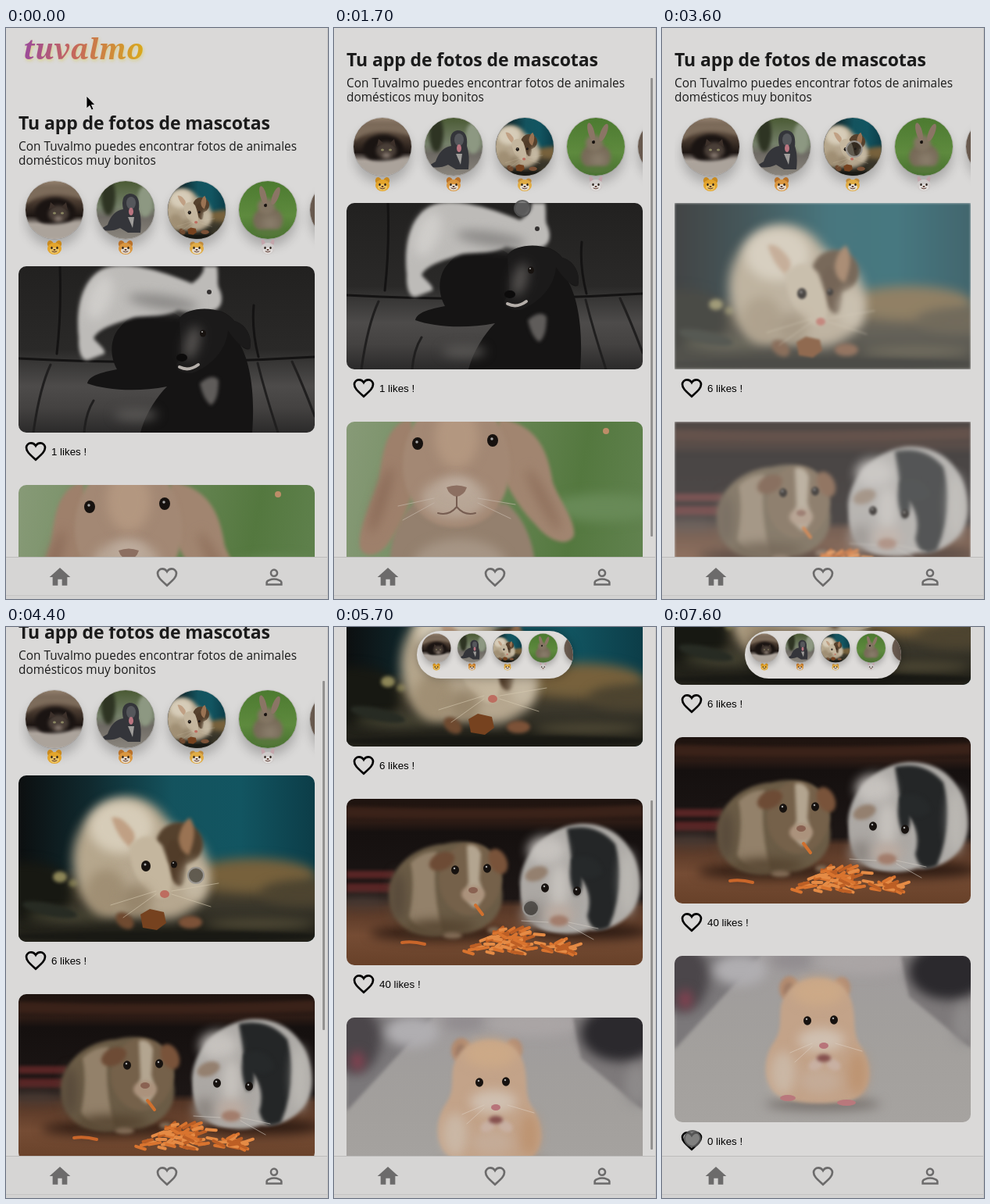
Animation, 412 px wide and 731 px high, one loop 8 s. Source, as an HTML page:

```html
<!DOCTYPE html>
<html lang="es">
<head>
<meta charset="utf-8">
<title>Fotos de mascotas</title>
<style>
html, body { margin: 0; width: 100%; height: 100%; overflow: hidden; }
body { position: relative; background: #dad9d8; color: #1b1b1b; }
div, svg, h1, p, span { position: absolute; margin: 0; }
#stage { left: 0; top: 0; width: 412px; height: 731px; overflow: hidden; background: #dad9d8; }
#page { left: 0; top: 0; width: 412px; height: 1196px; }
#logo { left: 15px; top: 6px; width: 200px; height: 50px; }
#logo text { font: italic bold 36px "Noto Serif", serif; }
h1 { left: 16px; top: 107px; font: bold 23px/28px "Open Sans", sans-serif; letter-spacing: -.1px; white-space: nowrap; }
p { left: 16px; top: 143px; font: 15.4px/18px "Open Sans", sans-serif; white-space: nowrap; }
.list { left: 16px; top: 189px; width: 379px; height: 122px; overflow: hidden; }
.thumb { top: 7px; width: 74px; height: 74px; border-radius: 50%; overflow: hidden; box-shadow: 0 10px 14px rgba(0,0,0,.22), 0 0 0 1px #c3c1bf; }
.thumb svg, .photo svg { left: 0; top: 0; width: 100%; height: 100%; filter: blur(.6px); }
.face { top: 82px; width: 20px; height: 20px; }
#pill { left: 106px; top: 5px; width: 400px; height: 122px; border-radius: 61px; background: #dedcda; transform: scale(.5); transform-origin: 0 0; }
#pillWrap { left: 0; top: 0; filter: drop-shadow(0 0 6px rgba(0,0,0,.3)); }
.post { left: 0; width: 412px; height: 280px; }
.frame { left: 16px; top: 0; width: 379px; height: 213px; overflow: hidden; border-radius: 10px; }
.photo { left: 0; top: 0; width: 379px; height: 213px; }
.icon { width: 32px; height: 32px; }
.likes { left: 58px; top: 230px; font: 13.333px/16px "Liberation Sans", Arial, sans-serif; color: #000; white-space: nowrap; }
#bar { left: 405px; top: 0; width: 3px; border-radius: 1px; background: #929190; }
#nav { left: 0; top: 677px; width: 412px; height: 48px; background: #d6d5d4; border-top: 1px solid #bdbcbb; border-bottom: 1px solid #c6c5c4; }
#foot { left: 0; top: 727px; width: 412px; height: 4px; background: #d3d2d1; }
#edge { left: 411px; top: 0; width: 1px; height: 731px; background: #c6c5c4; }
#touch { left: -11px; top: -11px; width: 18px; height: 18px; border: 2px solid rgba(165,162,158,.85); border-radius: 50%; background: rgba(32,30,28,.6); }
#touch.down { border-color: rgba(70,70,70,.55); background: rgba(105,105,105,.8); }
#arrow { left: 102px; top: 86px; width: 14px; height: 21px; }
.soft { filter: blur(7px); }
.fur { filter: blur(2px); }
</style>
</head>
<body>
<div id="stage"></div>
<script>
const oval = (x, y, rx, ry, fill, turn = 0, cls = "") =>
  `<ellipse class="${cls}" cx="${x}" cy="${y}" rx="${rx}" ry="${ry}" fill="${fill}" transform="rotate(${turn} ${x} ${y})"/>`;
const soft = (x, y, rx, ry, fill, turn) => oval(x, y, rx, ry, fill, turn, "soft");
const puff = (x, y, rx, ry, fill, turn) => oval(x, y, rx, ry, fill, turn, "fur");
const shape = (d, fill, cls = "") => `<path class="${cls}" d="${d}" fill="${fill}"/>`;
const fur = (d, fill) => shape(d, fill, "fur");
const line = (d, color, w = 1) => `<path d="${d}" fill="none" stroke="${color}" stroke-width="${w}" stroke-linecap="round"/>`;
const eye = (x, y, r) => oval(x, y, r, r * 1.15, "#17120f") + oval(x - 1, y - 2, r / 4, r / 4, "#aaa");

function carrots() {
  let seed = 7, out = "";
  const rnd = () => (seed = seed * 16807 % 2147483647) / 2147483647;
  for (let i = 0; i < 80; i++) {
    const y = 168 + rnd() * 28, half = 18 + (y - 168) * 2.2;
    const x = 210 + (rnd() * 2 - 1) * half + (y - 168) * .5;
    const a = rnd() * 2 - 1, n = 7 + rnd() * 8;
    out += line(`M${x.toFixed(1)} ${y.toFixed(1)}l${n.toFixed(1)} ${(a * 7).toFixed(1)}`, ["#d9742f", "#e58b45", "#bd5f25"][i % 3], 4);
  }
  return out + line("M71 184q14-2 29 2", "#c9662a", 4);
}

const photos = {
  couch: {
    bg: "linear-gradient(#222120, #2a2928 50%, #383736 58%, #4d4b4a 72%, #444241 85%, #2b2a2a)",
    art: line("M53 0q2 60 -4 112M301 50q-3 30 6 66M0 118q190 10 379-2", "#141313", 3)
      + line("M41 126q-14 30-22 87M96 172q-10 16-12 41M306 124q10 40 26 89M350 122q14 30 29 70", "#201f1f", 3)
      + shape("M130 78C150 52 190 50 208 66C225 50 262 50 276 70C292 74 300 92 296 106C290 108 284 102 281 96C296 120 303 160 299 213H156C162 190 176 168 190 154C150 162 110 158 88 150C90 140 106 136 126 132C114 110 120 88 130 78Z", "#151414")
      + fur("M89 120C82 122 76 112 77 92C72 50 84 12 112 2C140-8 190 8 222 22C232 16 240 4 236 0H254C256 12 254 20 256 27C263 40 261 54 249 57C236 60 218 60 204 55C190 66 166 62 146 66C124 74 104 78 96 92C102 100 112 106 110 112Z", "#bdbbb8")
      + soft(185, 46, 45, 9, "#8b8987", 8) + soft(104, 40, 15, 30, "#cfcdca", 20)
      + oval(244, 33, 3, 3, "#343131") + shape("M206 66C218 50 262 50 276 70C292 74 300 92 296 106C286 106 276 94 268 82C266 108 246 128 222 137C206 138 198 130 204 122C212 112 206 92 206 66Z", "#1b1a1a")
      + soft(222, 98, 9, 22, "#555250", 15) + oval(209, 117, 7, 5, "#0c0b0b")
      + line("M206 129q12 6 24-3", "#b5afaa", 4) + eye(236, 86, 4)
      + fur("M232 150q16-14 24-4q0 26-10 32q-10-8-14-28Z", "#5f5c5a") + soft(150, 190, 28, 7, "#5a5856")
  },
  lop: {
    bg: "linear-gradient(100deg, #879a77, #6b8858 45%, #54783f 75%, #628350)",
    art: soft(330, 110, 70, 18, "#688a57") + oval(332, 12, 4, 4, "#bd8d68")
      + fur("M62 213C50 175 56 135 85 105H205C236 130 246 180 240 213Z", "#94806e")
      + soft(145, 185, 60, 35, "#a69585")
      + fur("M82-4C50 4 46 40 42 72C32 105 14 138 17 160C22 176 40 172 52 158C72 130 84 100 92 62Z", "#9e806b")
      + fur("M196-4C246 4 258 40 264 78C274 104 294 128 291 146C282 162 258 152 242 132C218 108 198 72 186 34Z", "#a18570")
      + soft(44, 100, 7, 45, "#8b6b58", 18) + soft(252, 100, 7, 45, "#8f705c", -28)
      + fur("M92-5H190C216 35 216 80 190 114C166 142 116 142 94 116C64 80 66 30 92-5Z", "#a38874")
      + soft(141, 20, 28, 40, "#b39780") + soft(138, 98, 42, 26, "#b8a696")
      + eye(91, 28, 7) + eye(187, 24, 7) + soft(141, 84, 20, 12, "#bdab9c")
      + shape("M128 84q13-5 26 0q-3 10-13 12q-10-2-13-12Z", "#8c6f61")
      + line("M141 96v13q-10 12-24 8M141 109q10 12 24 8", "#765d51", 2)
      + line("M112 98l-46 10M112 104l-40 22M168 98l48 8M168 104l42 20", "#c5b8ab", .7)
  },
  mouse: {
    bg: "linear-gradient(rgba(0,0,0,0) 55%, #4a4230 68%, #38352a 80%, #24231b 92%), linear-gradient(90deg, #0c0f10, #10292e 24%, #14535e 52%, #125561 75%, #0c3d48)",
    art: soft(300, 128, 80, 22, "#77613c") + soft(360, 150, 50, 16, "#4d4430") + soft(10, 150, 60, 40, "#171812")
      + soft(60, 180, 50, 6, "#4c4a36") + soft(310, 190, 70, 6, "#57503a") + puff(190, 206, 200, 7, "#191914")
      + puff(53, 130, 9, 7, "#8d8657") + puff(70, 138, 6, 5, "#6c6840") + puff(40, 172, 36, 8, "#272b23", 12)
      + soft(136, 104, 66, 76, "#b6a78d", 12) + soft(186, 124, 58, 60, "#b6a78f")
      + soft(132, 66, 42, 34, "#d6ccb8") + soft(112, 150, 26, 30, "#a08f74")
      + puff(206, 88, 30, 28, "#55412d") + puff(202, 112, 12, 30, "#513c29", -10)
      + fur("M119 54Q132 50 147 72Q152 84 142 92Q126 78 119 54Z", "#c0a084")
      + fur("M219 54Q231 70 218 102Q206 98 205 80Q208 62 219 54Z", "#9a7353")
      + fur("M142 90Q164 66 184 90Q200 130 193 154Q180 162 166 148Q142 128 142 90Z", "#c4b69e")
      + soft(226, 136, 16, 26, "#c4b8a2") + soft(150, 160, 20, 20, "#97866c")
      + eye(163, 116, 6) + eye(199, 114, 4)
      + oval(187, 152, 6, 5, "#bd6d60") + puff(136, 186, 13, 9, "#6f4a30", 40) + puff(220, 188, 15, 8, "#7c5238")
      + shape("M156 178l12-7 18 4 3 14-12 9-18-3Z", "#76421f")
      + line("M176 148l-58 18M176 152l-42 30M196 148l60-10M196 152l50 16", "#d6c9b0", .6)
  },
  pigs: {
    bg: "linear-gradient(#1d130f, #2c1b15 14%, #15100f 20%, #1c1615 60%, #553626 65%, #754c34 82%, #684129)",
    art: fur("M0 10Q200 16 379 8V22Q200 28 0 24Z", "#3a2219") + fur("M0 92H62V102H0ZM0 108H60V120H0Z", "#582525") + soft(20, 132, 40, 8, "#4b3c35")
      + soft(120, 172, 90, 9, "#2c1a12") + soft(310, 170, 80, 10, "#2c1a12")
      + fur("M55 130C50 88 88 60 124 58C170 46 204 70 198 112C206 146 180 170 148 172C100 182 60 172 55 130Z", "#6b5c46")
      + fur("M82 82Q98 66 116 68Q108 110 122 168Q88 170 80 150Q88 110 82 82Z", "#93816a")
      + soft(120, 164, 46, 9, "#54432f") + soft(66, 125, 9, 32, "#57493a")
      + puff(158, 103, 40, 46, "#75614a") + fur("M154 60Q166 56 172 70L170 104Q180 130 164 140Q148 132 156 106Z", "#b3a590")
      + puff(122, 80, 17, 11, "#6d4b35", -25) + puff(194, 80, 11, 17, "#79533a", -25)
      + eye(139, 91, 5) + eye(180, 89, 5) + puff(162, 122, 15, 11, "#ab927c") + oval(162, 117, 6, 4, "#8a6252")
      + line("M165 136l9 12", "#d0702e", 4) + puff(136, 175, 12, 4, "#806a55") + puff(188, 168, 8, 4, "#806a55")
      + fur("M222 108C224 66 262 34 300 32C350 30 378 72 375 116C372 152 340 170 310 168C270 182 228 164 222 108Z", "#aeaba7")
      + fur("M282 38Q320 30 344 58Q358 110 336 164Q314 176 308 150Q318 116 290 92Z", "#242627")
      + soft(360, 108, 9, 42, "#bcb9b4") + puff(264, 124, 41, 46, "#aca8a4") + soft(256, 66, 24, 18, "#c6c2be")
      + soft(272, 112, 12, 30, "#c6c2bd") + soft(238, 148, 14, 16, "#8f8984")
      + fur("M288 76Q320 66 328 94Q316 106 302 100Q302 124 292 124Q282 100 288 76Z", "#26292a") + puff(243, 96, 15, 9, "#94806f", -20)
      + eye(254, 114, 5) + eye(295, 118, 5) + soft(272, 148, 19, 12, "#bcaba0") + puff(272, 156, 12, 7, "#a27d6c")
      + line("M284 158l38 8M284 162l32 18M258 158l-34-2", "#d2cbc3", .6) + carrots()
  },
  hamster: {
    bg: "linear-gradient(#a09c9d, #a19e9c 30%, #a3a09d 60%, #a6a3a0)",
    art: fur("M0 0H110L0 120Z", "#7b787a") + soft(10, 28, 34, 44, "#4b464a") + soft(84, 18, 34, 20, "#b0aeb1")
      + soft(150, 4, 26, 14, "#928d90") + soft(240, 8, 60, 16, "#aaa5a5") + fur("M290 0H379V118L300 52Z", "#7d797a")
      + soft(350, 20, 50, 36, "#2b292d") + soft(372, 86, 16, 26, "#8d8a8a") + soft(14, 56, 8, 12, "#8d4152")
      + soft(190, 190, 74, 8, "#77716d") + puff(147, 42, 13, 16, "#b28b70") + puff(214, 41, 11, 14, "#b38c72")
      + puff(147, 44, 7, 10, "#9a7763")
      + fur("M136 66C144 18 220 16 228 64C232 84 228 96 236 112C260 148 250 184 216 187C190 190 160 190 140 182C112 172 112 134 126 112C138 96 134 84 136 66Z", "#c3a389")
      + soft(184, 46, 34, 18, "#cca987") + soft(139, 150, 16, 28, "#cab7a5") + soft(234, 150, 12, 28, "#bd9472")
      + soft(188, 108, 30, 15, "#d0c0b1") + soft(186, 160, 26, 16, "#c4ab97") + eye(170, 83, 5) + eye(204, 82, 5) + oval(191, 115, 6, 4, "#b8747a")
      + puff(181, 139, 10, 7, "#c8b0a2", -30) + puff(203, 139, 10, 7, "#c8b0a2", 30) + puff(191, 131, 9, 5, "#85504e")
      + oval(145, 182, 10, 4, "#b9787c") + oval(220, 188, 12, 4, "#b9787c")
      + line("M176 112l-28 12M176 116l-22 20M206 112l34 10", "#dccfc2", .6)
  }
};

// Small round category pictures, drawn on a 74 unit square
const cat = { bg: "linear-gradient(#917f6c, #4b3c31 35%, #1d1613 60%, #b4aaa2 76%)",
  art: fur("M0 30Q30 6 74 24V8H0Z", "#7d6c5b") + puff(38, 40, 26, 19, "#1a1412") + puff(42, 42, 13, 11, "#4a3f38")
    + shape("M30 36l2-9 7 6ZM46 33l6-6 2 10Z", "#3c302a") + oval(37, 41, 2, 1.5, "#8a8662") + oval(47, 41, 2, 1.5, "#8a8662")
    + puff(42, 48, 5, 3, "#8a7c73") + fur("M0 54Q30 58 74 50V74H0Z", "#aba39b") };
const dog = { bg: "linear-gradient(#4a5a34, #75806a 45%, #6e6a64 62%, #8a857d)",
  art: puff(15, 20, 9, 24, "#2e3423") + puff(62, 26, 10, 20, "#8d9882") + shape("M14 56Q20 38 34 36Q30 18 42 16Q56 16 54 36Q58 48 56 66H40L30 60Q18 66 4 62Z", "#34353a")
    + oval(44, 28, 6, 8, "#55575b") + oval(44, 39, 3, 5, "#ba7580") + shape("M40 46h8l-2 14Z", "#a09e9b") };
const hare = { bg: "linear-gradient(#4c7a30, #5e8a3e 60%, #47702f)",
  art: puff(37, 50, 19, 17, "#776a58") + puff(35, 32, 11, 10, "#837563") + oval(31, 18, 4, 12, "#8b7565", -15) + oval(47, 19, 4, 12, "#8b7565", 22)
    + eye(34, 31, 2) + soft(40, 54, 9, 8, "#968a78") + puff(38, 66, 22, 4, "#55783a") };
const other = { bg: "linear-gradient(90deg, #6a5b50, #3d332d)", art: "" };
const cats = [cat, dog, photos.mouse, hare, other];

// Emoji-like heads: face, ear, muzzle colours and ear radii
const heads = [
  ["#e3a52c", "#c98a1f", "#edc563", 4, 5], ["#d9963f", "#b9722a", "#e6ddd0", 4, 5],
  ["#e0ac45", "#c08a3a", "#e8e2d6", 3.5, 3.5], ["#cfcbca", "#c3a5ab", "#e4e1df", 2.5, 7]
];
const head = ([c, ear, muzzle, rx, ry]) => oval(5, 6, rx, ry, ear, -20) + oval(15, 6, rx, ry, ear, 20)
  + oval(10, 11.5, 9, 7.5, c) + oval(10, 14, 6, 4, muzzle) + oval(6.5, 10.5, 1.2, 1.8, "#2b211a")
  + oval(13.5, 10.5, 1.2, 1.8, "#2b211a") + oval(10, 13, 1.5, 1, "#553026") + line("M7 15q3 2 6 0", "#553026");

const heart = "M12 20C6.5 15 3 12.2 3 8.5 3 6 5 4 7.5 4 9.3 4 11 5 12 6.7 13 5 14.7 4 16.5 4 19 4 21 6 21 8.5 21 12.2 17.5 15 12 20Z";
const icon = (x, y, art) => `<svg class="icon" style="left:${x - 16}px;top:${y - 16}px" viewBox="0 0 24 24">${art}</svg>`;
const svg = (box, art) => `<svg viewBox="${box}" preserveAspectRatio="xMidYMid slice">${art}</svg>`;
const wide = "0 0 379 213", square = "0 0 74 74", grey = "#6c6b6b";

const items = pad => cats.map((c, i) => {
  const x = pad + 91 * i;
  return `<div class="thumb" style="left:${x - 37}px;background:${c.bg}">${svg(c === photos.mouse ? wide : square, c.art)}</div>`
    + (heads[i] ? `<svg class="face" style="left:${x - 10}px" viewBox="0 0 20 20">${head(heads[i])}</svg>` : "");
}).join("");

const post = ([name, likes], i) => `<div class="post" style="top:${305 + 280 * i}px">
  <div class="frame"><div class="photo" style="background:${photos[name].bg}">${svg(wide, photos[name].art)}</div></div>
  ${icon(38, 237, line(heart, "#000", 2))}<span class="likes">${likes} likes !</span></div>`;
const feed = (id, posts) => `<div id="${id}">${posts.map(post).join("")}</div>`;

const $ = id => document.getElementById(id);
$("stage").innerHTML = `
<div id="page">
  <svg id="logo"><defs><linearGradient id="hue"><stop stop-color="#9a4a9c"/><stop offset=".4" stop-color="#c4655f"/><stop offset="1" stop-color="#d9a91c"/></linearGradient></defs>
    <text x="7" y="34" fill="url(#hue)" style="filter:drop-shadow(1px 2px 2px #d8cf8c)">tuvalmo</text></svg>
  <h1>Tu app de fotos de mascotas</h1>
  <p>Con Tuvalmo puedes encontrar fotos de animales<br>domésticos muy bonitos</p>
  <div class="list">${items(45.5)}</div>
  ${feed("first", [["couch", 1], ["lop", 2]])}
  ${feed("second", [["mouse", 6], ["pigs", 40], ["hamster", 0]])}
</div>
<div id="pillWrap"><div id="pill" class="list">${items(50)}</div></div>
<div id="bar"></div>
<div id="nav">${icon(69, 25, shape("M10 20v-6h4v6h5v-8h3L12 3 2 12h3v8z", grey))}${icon(206, 25, line(heart, grey, 2))}
${icon(343, 25, line("M12 4.95a3.05 3.05 0 1 1 0 6.1 3.05 3.05 0 1 1 0-6.1M4.95 19.05v-2c0-1.6 4-3.1 7.05-3.1s7.05 1.5 7.05 3.1v2z", grey, 1.9))}</div>
<div id="foot"></div><div id="edge"></div>
<svg id="arrow" viewBox="-1 -1 14 21"><path d="M0 0V16L4 12.5 6.5 18 9 17 6.5 11.5H11Z" fill="#000" stroke="#eee" stroke-width=".8"/></svg>
<div id="touch"></div>`;

const LOOP = 8000, STEP = 100, SWITCH = 3200, PILL = 4750;
const scrolling = [[1300, 0], [1700, 81], [4100, 81], [4300, 115], [4500, 115], [4800, 244], [5200, 244], [5500, 365], [5700, 365], [5900, 444]];
const barFade = [[1300, 0], [1400, 1], [2200, 1], [2600, 0], [4100, 0], [4200, 1], [6200, 1], [6500, 0]];
const finger = [
  [100, 106, 119], [200, 107, 93], [500, 107, 93], [1100, 269, 350], [1300, 269, 350], [1700, 241, 231], [2900, 241, 231],
  [3200, 246, 155], [3800, 246, 155], [4100, 246, 350], [4300, 244, 305], [4400, 243, 318], [4500, 246, 358], [4800, 240, 230],
  [5000, 240, 230], [5100, 248, 358], [5200, 248, 358], [5500, 238, 230], [5700, 252, 360], [5900, 232, 231], [6100, 238, 258],
  [6200, 238, 258], [6500, 250, 376], [6600, 250, 376], [7500, 54, 632], [7600, 39, 655]
];
const presses = [[1400, 1800], [3200, 3300], [4200, 4300], [4600, 4800], [5300, 5500], [5800, 5900], [7600, LOOP]];

function track(keys, t) {
  const i = keys.findIndex(k => k[0] > t);
  if (i < 0) return keys[keys.length - 1].slice(1);
  if (!i) return keys[0].slice(1);
  const a = keys[i - 1], b = keys[i], p = (t - a[0]) / (b[0] - a[0]);
  return a.slice(1).map((v, n) => v + (b[n + 1] - v) * p);
}

function fade(el, start, t) {
  const p = Math.min(1, Math.max(0, (t - start) / 1000));
  const o = 1 - (1 - p) ** 2.2;
  el.style.opacity = o;
  el.style.filter = o < 1 ? `blur(${5 * (1 - o)}px)` : "none";
  return p < 1;
}

const late = [...$("second").querySelectorAll(".frame")];

function draw(now) {
  const t = Math.floor(now % LOOP / STEP) * STEP;
  const [y] = track(scrolling, t), [x, fy] = track(finger, t);
  const switched = t >= SWITCH, ratio = 731 / (switched ? 1196 : 910);
  $("page").style.transform = `translateY(${-Math.round(y)}px)`;
  $("first").style.display = switched ? "none" : "";
  $("second").style.display = switched ? "" : "none";
  late.forEach((f, i) => {
    f.style.borderRadius = fade(f.firstChild, i < 2 ? 3150 : 4680, t) ? "0" : "10px";
  });
  fade($("pill"), PILL, t);
  $("pillWrap").style.display = t > PILL ? "" : "none";
  $("bar").style.cssText = `top:${y * ratio - 1}px;height:${731 * ratio}px;opacity:${track(barFade, t)[0]}`;
  $("arrow").style.display = t < 100 ? "" : "none";
  $("touch").style.display = t < 100 ? "none" : "";
  $("touch").style.transform = `translate(${x}px,${fy}px)`;
  $("touch").className = presses.some(([a, b]) => t >= a && t < b) ? "down" : "";
}

let begin;
function loop(now) {
  begin ??= now;
  draw(now - begin);
  requestAnimationFrame(loop);
}
draw(0);
requestAnimationFrame(loop);
</script>
</body>
</html>
```
